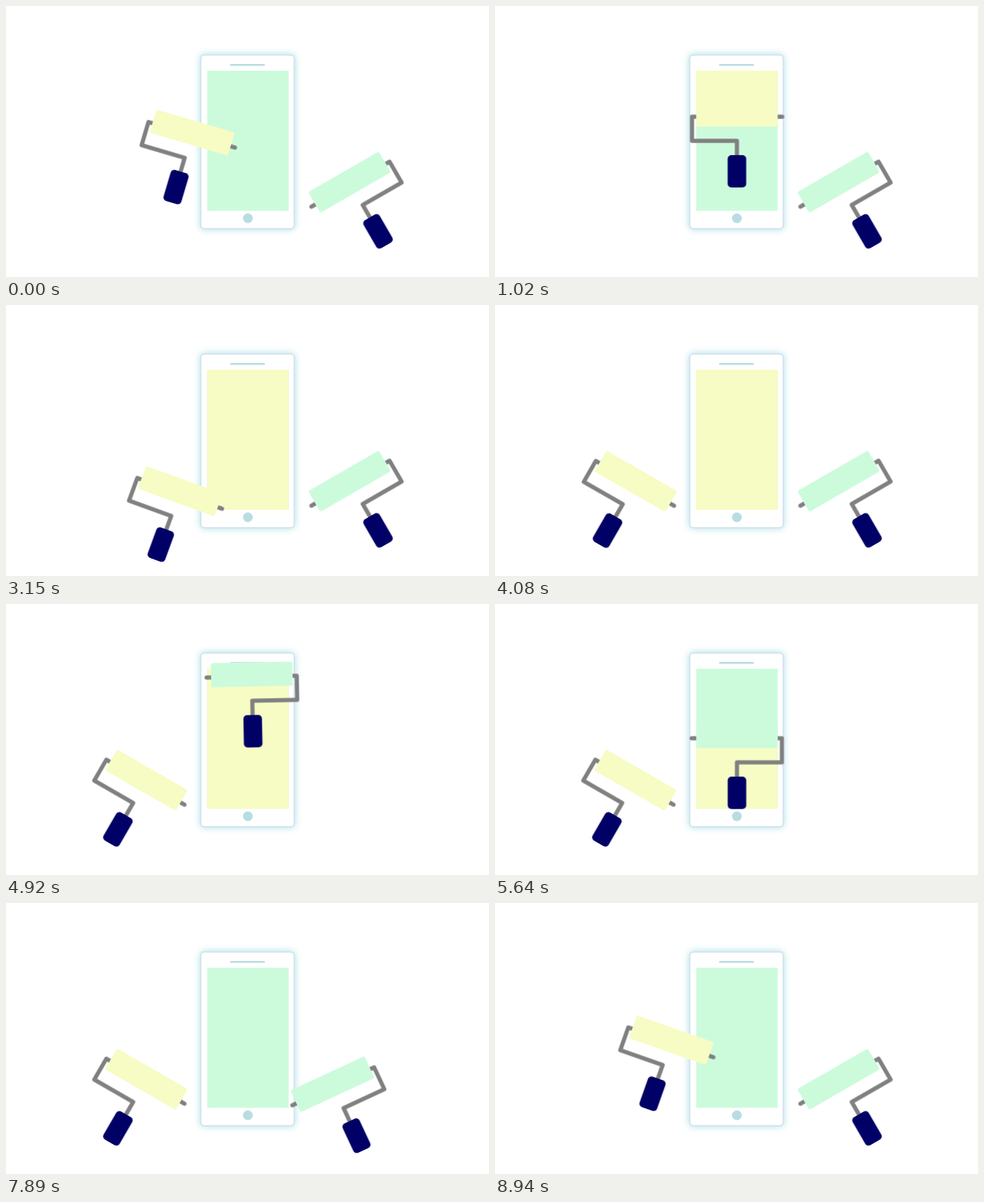
Write an HTML page that moves like this. It is 640 by 360 pixels and loops after 8970 ms.

```html
<!DOCTYPE html>
<html lang="en">
<head>
<meta charset="utf-8">
<title>Paint rollers</title>
<style>
  html, body { margin: 0; width: 100%; height: 100%; overflow: hidden; background: #fff; }
  .stage { position: relative; width: 640px; height: 360px; overflow: hidden; }
  .phone {
    position: absolute; left: 257px; top: 64px; width: 126px; height: 233px;
    box-sizing: border-box; border: 2px solid #d3e6ee; border-radius: 6px;
    background: #fff; box-shadow: 0 0 10px #b0e0e6;
  }
  svg { position: absolute; left: 0; top: 0; }

  .mint { fill: #ccfbdc; }
  .yellow { fill: #f6fcc3; }
  .detail { fill: #b8dde1; }
  .rod { fill: none; stroke: #808080; stroke-width: 5.5; stroke-linecap: round; stroke-linejoin: round; }
  .grip { fill: #006; }

  .roller, .paint { animation: roll 8979ms ease -242ms infinite; }
  .right { animation-delay: -4737ms; }
  .paint { animation-name: paint; transform-origin: 0 86px; }

  /* lift to the top of the screen, roll down, return to rest */
  @keyframes roll {
    0%, 50%, 100% { transform: translate(455.2px, 234px) rotate(-30deg); }
    10% { transform: translate(320.6px, 88px) rotate(0deg); }
    30% { transform: translate(320.6px, 274px) rotate(0deg); }
  }
  /* yellow grows from the top, then is covered from the top */
  @keyframes paint {
    0%, 10% { transform: translateY(0) scaleY(0); }
    30%, 60% { transform: translateY(0) scaleY(1); }
    80%, 100% { transform: translateY(186px) scaleY(0); }
  }
</style>
</head>
<body>
<div class="stage">
  <div class="phone"></div>
  <svg width="640" height="360" viewBox="0 0 640 360">
    <defs>
      <g id="frame">
        <path class="rod" d="M-60 3H59.5V35H0V56"/>
        <rect class="grip" x="-12.3" y="54" width="24.6" height="43" rx="5"/>
      </g>
      <rect id="sleeve" x="-54" y="-16" width="108" height="32" rx="2.5"/>
    </defs>

    <rect class="detail" x="297" y="77" width="46" height="2.6" rx="1.3"/>
    <circle class="detail" cx="320.5" cy="282" r="6.5"/>
    <rect class="mint" x="266.6" y="86" width="108" height="186"/>
    <rect class="paint yellow" x="266.6" y="86" width="108" height="186"/>

    <g transform="matrix(-1 0 0 1 641.2 0)">
      <g class="roller">
        <use href="#frame"/>
        <use href="#sleeve" class="yellow"/>
      </g>
    </g>
    <g class="roller right">
      <use href="#frame"/>
      <use href="#sleeve" class="mint"/>
    </g>
  </svg>
</div>
<script>
  // The loop is cut slightly before the keyframes come round.
  const LOOP = 8970;
  const moves = document.getAnimations();
  moves.forEach(m => m.pause());
  let start;

  function tick(now) {
    start ??= now;
    const t = (now - start) % LOOP;
    moves.forEach(m => { m.currentTime = t; });
    requestAnimationFrame(tick);
  }
  requestAnimationFrame(tick);
</script>
</body>
</html>
```
